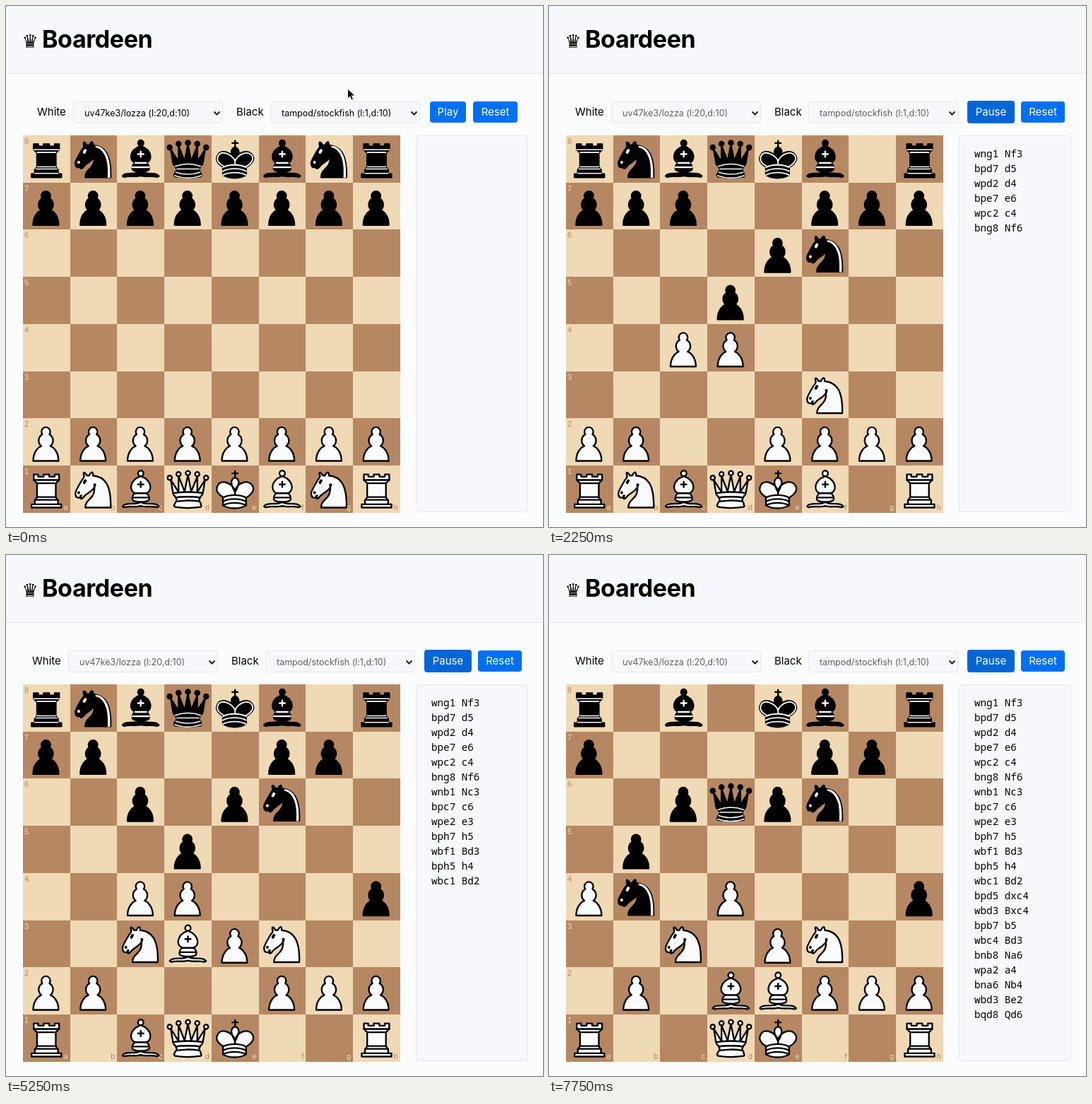
An HTML page for the animation above (8 s loop, 760x737 px).

```html
<!DOCTYPE html>
<html lang="en">
<head>
<meta charset="utf-8">
<style>
html, body { margin: 0; width: 100%; height: 100%; overflow: hidden; background: #fbfcfe }
svg { display: block }
text { font: 15px Inter, sans-serif; white-space: pre }
.title { font: bold 34px Inter, sans-serif; letter-spacing: -.4px }
.crown { font: 26px "DejaVu Sans", sans-serif }
.option { font-size: 12.5px }
.button { fill: #fbfcfe; text-anchor: middle }
.coord { font: 11px "Liberation Sans", Arial, sans-serif }
.file { text-anchor: end }
.log { font: 14.25px "Noto Sans Mono", monospace }
.panel { fill: #f6f8fb; stroke: #e5e7eb }
</style>
</head>
<body>
<svg width="760" height="737" viewBox="0 0 760 737">
  <defs id="defs"></defs>
  <path fill="#f6f8fb" d="M0 0h760v95H0z"/>
  <path stroke="#e2e5e9" d="M0 95.5h760"/>
  <text class="crown" x="22.5" y="58.5">♛</text>
  <text class="title" x="51" y="59">Boardeen</text>
  <rect class="panel" x="580.5" y="183.5" width="158" height="532" rx="4"/>
  <g id="controls"></g>
  <g id="board"></g>
  <g id="pieces"></g>
  <g id="log"></g>
  <path id="cursor" d="M0 0v14l3.2-3 2.2 5 2.6-1.1-2.2-4.9h4.6z" stroke="#fff"/>
</svg>
<script>
const LOOP = 8000, STEP = 250, GLIDE = 200, LOG_LEAD = 80, PLAY_AT = 750;
const LEFT = 23.9, TOP = 182.9, CELL = 66.75, PIECE_SCALE = 1.56;
const LIGHT = '#f0d9b5', DARK = '#b58863', WHITE = '#fbfcfe';
const $ = id => document.getElementById(id);

// Each shape: outline, detail lines, detail width; drawn in a 45-unit box.
const kingLines = 'M11.5 30C17 27 27 27 32.5 30M11.5 33.5C17 30.5 27 30.5 32.5 33.5M11.5 37C17 34 27 34 32.5 37';
const queenBase = 'M9 26C9 28 10.5 28 11.5 30C12.5 31.5 12.5 31 12 33.5C10.5 34.5 10.5 36 10.5 36C9 37.5 11 38.5 11 38.5C17.5 39.5 27.5 39.5 34 38.5C34 38.5 35.5 37.5 34 36C34 36 34.5 34.5 33 33.5C32.5 31 32.5 31.5 33.5 30C34.5 28 36 28 36 26C27.5 24.5 17.5 24.5 9 26z';
const crownBalls = [[6, 12], [14, 8.7], [22.5, 7.8], [31, 8.7], [39, 12]]
  .map(([x, y]) => `M${x - 2} ${y}a2 2 0 1 1 4 0a2 2 0 1 1-4 0z`).join('');
const shapes = {
  p: ['M22 9C19.79 9 18 10.79 18 13C18 13.89 18.29 14.71 18.78 15.38C16.83 16.5 15.5 18.59 15.5 21C15.5 23.03 16.44 24.84 17.91 26.03C14.91 27.09 10.5 31.58 10.5 39.5L33.5 39.5C33.5 31.58 29.09 27.09 26.09 26.03C27.56 24.84 28.5 23.03 28.5 21C28.5 18.59 27.17 16.5 25.22 15.38C25.71 14.71 26 13.89 26 13C26 10.79 24.21 9 22 9z', '', 1.5],
  r: ['M9 39h27v-3H9zM12 36v-4h21v4zM11 14V9h4v2h5V9h5v2h5V9h4v5l-3 3v12.5l1.5 2.5h-20l1.5-2.5V17z', 'M11 14h23M14 17h17M14 29.5h17', 1.5],
  n: ['M22 10C32.5 11 38.5 18 38 39L15 39C15 30 25 32.5 23 18M24 18C24.38 20.91 18.45 25.37 16 27C13 29 13.18 31.34 11 31C9.96 30.06 12.41 27.96 11 28C10 28 11.19 29.23 10 30C9 30 6 31 6 26C6 24 12 14 12 14C12 14 13.89 12.1 14 10.5C13.27 9.5 13.5 8.5 13.5 7.5C14.5 6.5 16.5 10 16.5 10L18.5 10C18.5 10 19.28 8 21 7C22 7 22 10 22 10', 'M9 25.4v.2M15 14.6l-1 1.8', 2.5],
  b: ['M9 36C12.39 35.03 19.11 36.43 22.5 34C25.89 36.43 32.61 35.03 36 36C36 36 37.65 36.54 39 38C38.32 38.97 37.35 38.99 36 38.5C32.61 37.53 25.89 38.96 22.5 37.5C19.11 38.96 12.39 37.53 9 38.5C7.65 38.99 6.68 38.97 6 38C7.35 36.06 9 36 9 36zM15 32C17.5 34.5 27.5 34.5 30 32C30.5 30.5 30 30 30 30C30 27.5 27.5 26 27.5 26C33 24.5 33.5 14.5 22.5 10.5C11.5 14.5 12 24.5 17.5 26C17.5 26 15 27.5 15 30C15 30 14.5 30.5 15 32zM25 8a2.5 2.5 0 1 1-5 0a2.5 2.5 0 1 1 5 0z', 'M17.5 26h10M15 30h15M22.5 15.5v5M20 18h5', 1.5],
  q: ['M9 26C17.5 24.5 30 24.5 36 26L38 14L31 25L31 11L25.5 24.5L22.5 9.5L19.5 24.5L14 10.5L14 25L7 14z' + queenBase + crownBalls, 'M11.5 30C15 29 30 29 33.5 30M12 33.5C18 32.5 27 32.5 33 33.5', 1.5],
  k: ['M22.5 11.6V6M20 8h5M22.5 25C22.5 25 27 17.5 25.5 14.5C25.5 14.5 24.5 12 22.5 12C20.5 12 19.5 14.5 19.5 14.5C18 17.5 22.5 25 22.5 25M11.5 37C17 40.5 27 40.5 32.5 37L32.5 30C32.5 30 41.5 25.5 38.5 19.5C34.5 13 25 16 22.5 23.5L22.5 27L22.5 23.5C19 16 9.5 13 6.5 19.5C3.5 25.5 11.5 29.5 11.5 29.5z', kingLines, 1.5]
};
const blackDetails = {
  r: ['M12 35.5h21M13 31.5h19M14 29.5h17M14 16.5h17M11 14h23', 1],
  q: ['M11 29A35 35 0 0 1 34 29M12.5 31.5h20M11.5 34.5A35 35 0 0 0 33.5 34.5M10.5 37.5A35 35 0 0 0 34.5 37.5', 1],
  k: [kingLines + 'M32 29.5C32 29.5 40.5 25.5 38.03 19.85C34.15 14 25 18 22.5 24.5L22.5 26.6L22.5 24.5C20 18 9.9 14 7 19.85C4.5 25.5 11.85 28.85 11.85 28.85', 1.2]
};
const mane = `<path stroke="none" fill="${WHITE}" d="M24.55 10.4L24.1 11.85L24.6 12C27.75 13 30.25 14.49 32.5 18.75C34.75 23.01 35.75 29.06 35.25 39L35.2 39.5L37.45 39.5L37.5 39C38 28.94 36.62 22.15 34.25 17.66C31.88 13.17 28.46 11.02 25.06 10.5z"/>`;

function pieceDef(side, kind) {
  const [outline, ...plain] = shapes[kind], black = side === 'b';
  const [lines, width] = black && blackDetails[kind] || plain;
  return `<g id="${side + kind}" stroke="#000" stroke-width="1.5" stroke-linecap="round" stroke-linejoin="round">
    <path d="${outline}" fill="${black ? '#000' : WHITE}"/>
    <path d="${lines}" fill="none" stroke="${black ? WHITE : '#000'}" stroke-width="${width}"/>
    ${black && kind === 'n' ? mane : ''}</g>`;
}
$('defs').innerHTML = [...'wb'].map(s => Object.keys(shapes).map(k => pieceDef(s, k)).join('')).join('');

const text = (cls, x, y, str, fill = '#000') => `<text class="${cls}" x="${x}" y="${y}" fill="${fill}">${str}</text>`;

function drawBoard() {
  let out = '';
  for (let row = 0; row < 8; row++) for (let col = 0; col < 8; col++) {
    const x = LEFT + col * CELL, y = TOP + row * CELL;
    const [back, ink] = (row + col) % 2 ? [DARK, LIGHT] : [LIGHT, DARK];
    out += `<rect x="${x}" y="${y}" width="${CELL}" height="${CELL}" fill="${back}" shape-rendering="crispEdges"/>`;
    if (!col) out += text('coord', x + 2, y + 12, 8 - row, ink);
    if (row === 7) out += text('coord file', x + CELL - 3, y + CELL - 4, 'abcdefgh'[col], ink);
  }
  $('board').innerHTML = out;
}

const button = (x, y, w, h, label, fill) =>
  `<rect x="${x}" y="${y}" width="${w}" height="${h}" rx="4" fill="${fill}"/>` +
  text('button', x + w / 2, 155, label, WHITE);
const select = (x, label, ink) =>
  `<rect class="panel" x="${x + .5}" y="135.5" width="211" height="30" rx="4"/>` +
  text('option', x + 16, 155.5, label, ink) +
  `<path d="M${x + 199.5} 149.5l4 4 4-4" fill="none" stroke="#222" stroke-width="2"/>`;

function drawControls(t) {
  const playing = t >= PLAY_AT, shift = playing ? -7 : 0, ink = playing ? '#606163' : '#000';
  $('controls').innerHTML =
    text('', 44 + shift, 155, 'White') + select(95 + shift, 'uv47ke3/lozza (l:20,d:10)', ink) +
    text('', 326 + shift, 155, 'Black') + select(374 + shift, 'tampod/stockfish (l:1,d:10)', ink) +
    (playing ? button(592, 134, 67, 32, 'Pause', '#0366d6')
             : button(600, 135, 51, 30, 'Play', t >= 500 ? '#0366d6' : '#0070f3')) +
    button(playing ? 668 : 661, 135, playing ? 62 : 63, 30, 'Reset', '#0070f3');
  $('cursor').style.display = playing ? 'none' : '';
  $('cursor').setAttribute('transform', `translate(${483.5 + t * .27} ${117 + t * .064})`);
}

const moves = `wng1 Nf3,bpd7 d5,wpd2 d4,bpe7 e6,wpc2 c4,bng8 Nf6,wnb1 Nc3,bpc7 c6,wpe2 e3,bph7 h5,wbf1 Bd3,
bph5 h4,wbc1 Bd2,bpd5 dxc4,wbd3 Bxc4,bpb7 b5,wbc4 Bd3,bnb8 Na6,wpa2 a4,bna6 Nb4,wbd3 Be2,bqd8 Qd6`
  .split(/,\s*/);
const starts = [870, 1010, 1230, 1420, 1707, 1830, 2400, 2740, 3200, 3820, 3880,
  4240, 5330, 5560, 5810, 6084, 6168, 6540, 6760, 7000, 7410, 7540];

function startPosition() {
  const squares = {};
  [...'rnbqkbnr'].forEach((kind, i) => {
    const file = 'abcdefgh'[i];
    squares[file + 8] = 'b' + kind;
    squares[file + 7] = 'bp';
    squares[file + 2] = 'wp';
    squares[file + 1] = 'w' + kind;
  });
  return squares;
}
const corner = sq => [LEFT + (sq.charCodeAt(0) - 97) * CELL, TOP + (8 - sq[1]) * CELL];
const place = (id, [x, y]) =>
  `<use href="#${id}" transform="translate(${x - 1.8} ${y - 1.5}) scale(${PIECE_SCALE})"/>`;

function drawPieces(t) {
  const squares = startPosition();
  let gliding = '';
  moves.forEach((move, i) => {
    const p = Math.min((t - starts[i]) / GLIDE, 1);
    if (p <= 0) return;
    const from = move.slice(2, 4), to = move.slice(-2), id = squares[from];
    delete squares[from];
    if (p === 1) { squares[to] = id; return; }
    const eased = .5 - Math.cos(Math.PI * p) / 2, a = corner(from), b = corner(to);
    gliding += place(id, a.map((v, k) => v + (b[k] - v) * eased));
  });
  $('pieces').innerHTML = Object.keys(squares).map(sq => place(squares[sq], corner(sq))).join('') + gliding;
  $('log').innerHTML = moves.filter((_, i) => t >= starts[i] - LOG_LEAD)
    .map((move, i) => text('log', 602, 214 + i * 21, move)).join('');
}

let shown = -1;
function frame(now) {
  const t = Math.floor(now % LOOP / STEP) * STEP;
  if (t !== shown) {
    shown = t;
    drawControls(t);
    drawPieces(t);
  }
  requestAnimationFrame(frame);
}
drawBoard();
frame(0);
</script>
</body>
</html>
```
